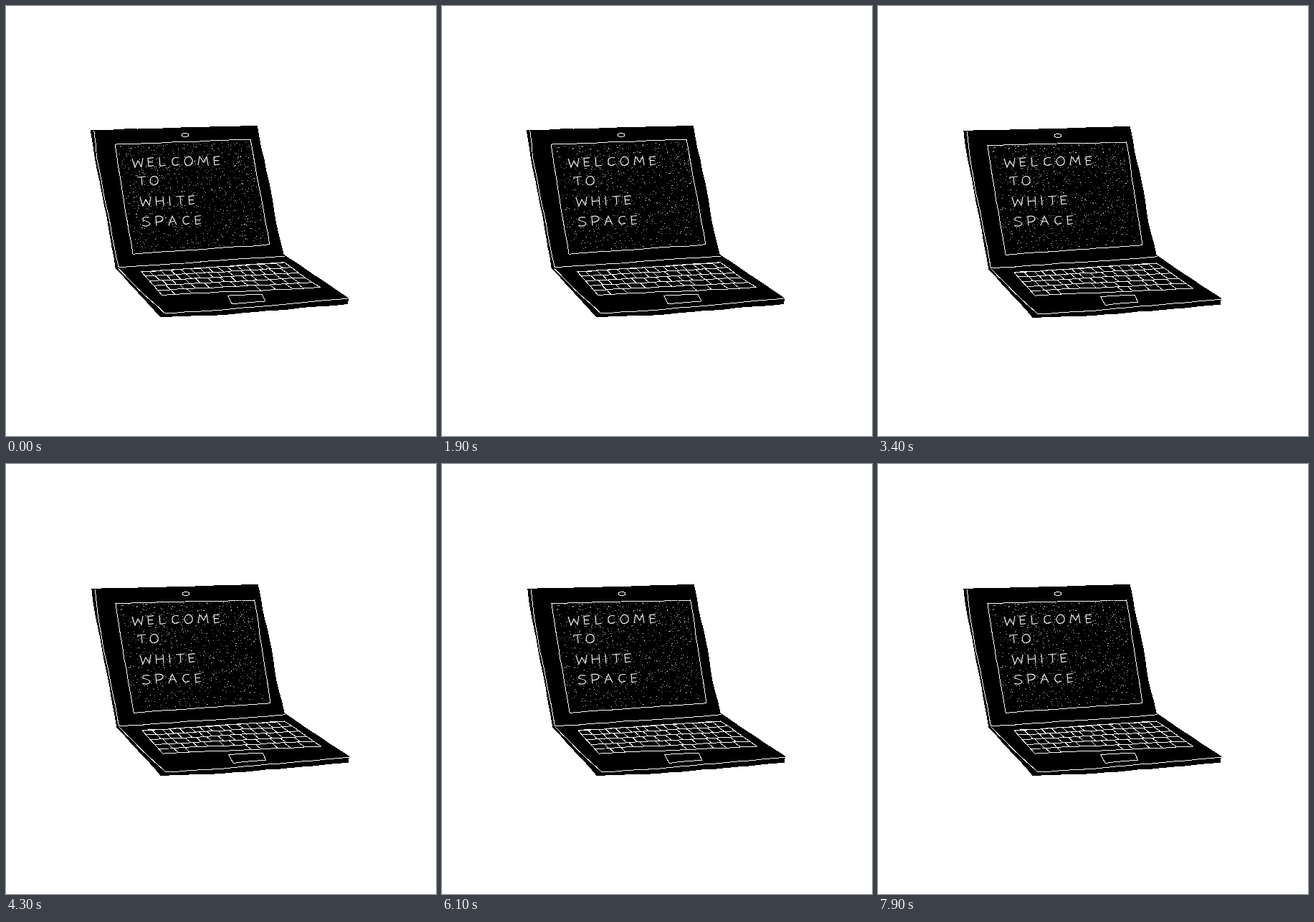
An HTML page for the animation above (8 s loop, 600 by 600 pixels).

```html
<!DOCTYPE html>
<html lang="en">
<head>
<meta charset="utf-8">
<title>Welcome to white space</title>
<style>
  html, body { margin: 0; width: 100%; height: 100%; overflow: hidden; background: #fff; }
  svg { display: block; width: 100vw; height: 100vh; }
  path, ellipse { fill: none; stroke: #fff; stroke-width: 1; shape-rendering: crispEdges; }
  .body { fill: #000; stroke: none; }
  .letter { stroke: #eee; shape-rendering: auto; stroke-width: 1.2; }
</style>
</head>
<body>
<svg id="stage" viewBox="0 0 600 600" role="img" aria-label="Welcome to white space"></svg>
<script>
const LOOP = 8000, STEP = 100, BOIL_START = 600;
const BOIL = 'CBCBABACA';
const stage = document.getElementById('stage');

// The same laptop drawn three times: nudged a little, with its own wobble.
const drawings = {
  A: { seed: 3, dx: 0, dy: 0, corner: [341, 186] },
  B: { seed: 11, dx: 1, dy: 1, corner: [346, 189] },
  C: { seed: 24, dx: 1, dy: .5, corner: [345, 187] }
};

const body = [
  [118, 173], [200, 171], [351, 167], [357, 200], [370, 258], [376, 300], [388, 347], [478, 407],
  [477, 416], [300, 431], [215, 434], [182, 398], [153, 366], [143, 308], [124, 212]
];
const lidEdge = [[123, 174], [127, 212], [136, 260], [157, 365], [389, 349]];
const frontEdge = [[157, 366], [186, 396], [222, 429], [300, 424], [478, 408]];
const pad = [[309, 404], [357, 402], [362, 412], [316, 416]];
const keyboard = [[189, 371], [388, 358], [438, 393], [218, 403]];
const grainArea = [[155, 195], [341, 189], [365, 331], [179, 343]];

// Letter shapes: width and strokes, 12 units tall.
const glyphs = {
  A: [11, 'M0 13L5 0 11 12M2 8L9 7'],
  C: [10, 'M10 1Q0 -1 1 7Q2 14 10 10'],
  E: [8, 'M8 0L0 1 1 12 8 11M1 6L7 6'],
  H: [11, 'M0 0L1 13M10 0L11 13M0 7L11 6'],
  I: [1, 'M0 0L1 13'],
  L: [9, 'M0 0L1 12 9 11'],
  M: [14, 'M0 12L2 0 8 8 12 0 14 12'],
  O: [11, 'M5 0C-2 1 -1 13 6 12C14 10 12 -1 5 0'],
  P: [10, 'M1 13L0 0Q10 -2 10 4Q8 8 1 8'],
  S: [11, 'M10 1Q0 -1 1 5Q11 7 11 10Q8 15 0 12'],
  T: [10, 'M0 1L12 0M6 1L7 12'],
  W: [14, 'M0 1L4 13 8 4 13 12 15 0']
};
const lines = [['WELCOME', 176, 212], ['TO', 183, 238], ['WHITE', 187, 266], ['SPACE', 190, 294]];

function random(seed) {
  let s = seed * 7919 + 17;
  return () => (s = (s * 16807) % 2147483647) / 2147483647;
}

const mix = (a, b, u) => a + (b - a) * u;
const between = (p, q, u) => [mix(p[0], q[0], u), mix(p[1], q[1], u)];
const inQuad = ([a, b, c, d], u, v) => between(between(a, b, u), between(d, c, u), v);

function add(parent, name, attributes) {
  const node = document.createElementNS('http://www.w3.org/2000/svg', name);
  for (const key in attributes) node.setAttribute(key, attributes[key]);
  return parent.appendChild(node);
}

// A line through the points with a slightly unsteady hand.
function sketch(points, rnd, closed) {
  const path = closed ? [...points, points[0]] : points;
  const wobbly = [];
  path.forEach((p, i) => {
    const q = path[i + 1] || p;
    const pieces = Math.max(1, Math.round(Math.hypot(q[0] - p[0], q[1] - p[1]) / 16));
    for (let k = 0; k < pieces; k++)
      wobbly.push(between(p, q, k / pieces).map(c => (c + rnd() - .5).toFixed(1)));
  });
  return 'M' + wobbly.map(p => p.join(' ')).join('L');
}

function keyboardPath(rnd) {
  const at = (u, v) => inQuad(keyboard, u, v);
  let d = sketch(keyboard, rnd, true);
  for (let row = 0; row < 5; row++) {
    const keys = 15 - row, top = row / 5, bottom = top + .2;
    d += sketch([at(0, top), at(1, top)], rnd);
    for (let i = 1; i < keys; i++) {
      const u = (i + .3 * rnd() - .15) / keys;
      const underSpaceBar = row === 4 && u > .25 && u < .55;
      if (!underSpaceBar) d += sketch([at(u, top), at(u, bottom)], rnd);
    }
  }
  return d;
}

function addLaptop({ seed, dx, dy, corner }) {
  const rnd = random(seed);
  const screen = [[152, 193], corner, [368, 333], [177, 346], [164, 270]];
  const group = add(stage, 'g', { transform: `translate(${dx} ${dy})` });
  const strokes = sketch(lidEdge, rnd) + sketch(frontEdge, rnd) +
    sketch(screen, rnd, true) + sketch(pad, rnd, true) + keyboardPath(rnd);
  add(group, 'path', { d: sketch(body, rnd, true), class: 'body' });
  add(group, 'path', { d: strokes });
  add(group, 'ellipse', { cx: 250, cy: 180, rx: 5, ry: 2.5 });
  return group;
}

function addGrain(seed) {
  const rnd = random(seed), group = add(stage, 'g');
  for (const [color, count] of [['#555', 600], ['#999', 350], ['#eee', 260]]) {
    let d = '';
    for (let i = 0; i < count; i++) {
      const [x, y] = inQuad(grainArea, rnd(), rnd() ** 1.15).map(Math.round);
      d += `M${x} ${y}.5h1`;
    }
    add(group, 'path', { d, style: 'stroke:' + color });
  }
  return group;
}

function addLettering() {
  for (const [text, left, top] of lines) {
    let x = left;
    for (const letter of text) {
      const [width, d] = glyphs[letter];
      const y = top - (x - left) * .02;
      add(stage, 'path', { d, class: 'letter', transform: `translate(${x} ${y})` });
      x += width + 8;
    }
  }
}

const poses = {};
for (const name in drawings) poses[name] = addLaptop(drawings[name]);
const grains = [5, 6, 7].map(addGrain);
addLettering();

const show = (node, visible) => node.style.display = visible ? '' : 'none';

function draw() {
  const t = performance.now() % LOOP;
  const step = Math.floor((t - BOIL_START) / STEP);
  const pose = step < 0 ? 'A' : BOIL[step % BOIL.length];
  const grain = t < 200 ? 0 : t < 300 ? 1 : 2;
  for (const name in poses) show(poses[name], name === pose);
  grains.forEach((node, i) => show(node, i === grain));
  requestAnimationFrame(draw);
}
draw();
</script>
</body>
</html>
```
